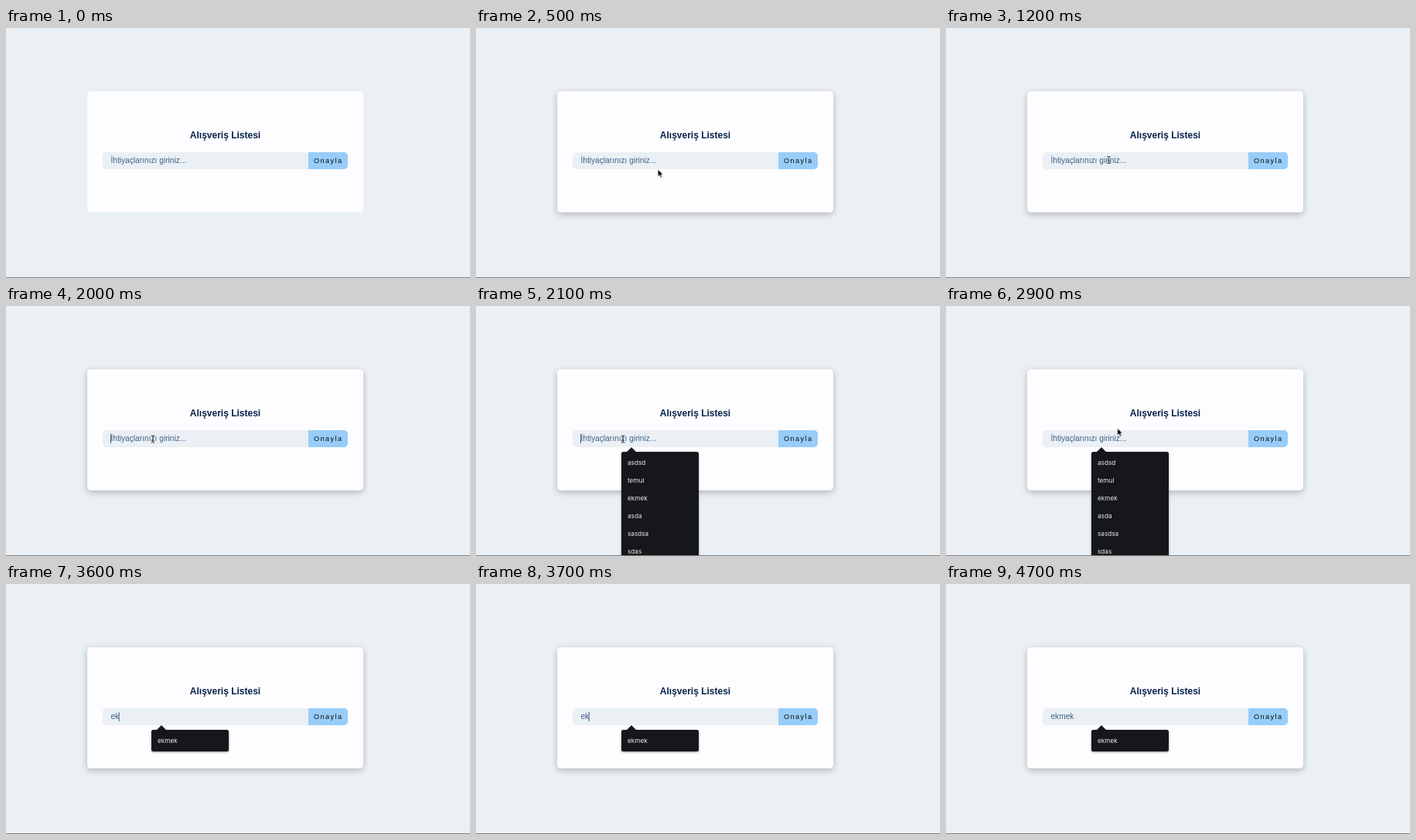
Animation of 600 by 324 pixels, one loop 5 s. Source, as an HTML page:

```html
<!DOCTYPE html>
<html lang="tr">
<head>
<meta charset="utf-8">
<title>Alışveriş Listesi</title>
<style>
  html, body { margin: 0; width: 100%; height: 100%; overflow: hidden; }
  .stage {
    position: relative; width: 600px; height: 324px; overflow: hidden;
    background: #ebf0f4; font-family: "Liberation Sans", Arial, sans-serif;
  }
  .stage div, .stage svg { position: absolute; box-sizing: border-box; white-space: nowrap; }
  .stage::after {
    content: ""; position: absolute; left: 0; top: 323px;
    width: 600px; height: 1px; background: #7b7f85;
  }

  .shadow, .card { left: 105px; top: 82px; width: 357px; height: 157px; border-radius: 5px; }
  .card { background: #fdfcfe; }
  .shadow { box-shadow: 0 2.5px 8px rgba(0, 0, 0, .25); animation: lift 5s infinite; }

  .title {
    left: 105px; top: 129px; width: 357px; line-height: 20px;
    text-align: center; font-size: 12px; font-weight: bold; color: #06234a;
  }
  .field, .button { top: 161px; height: 22px; line-height: 22px; }
  .field {
    left: 125px; width: 266px; border-radius: 5px 0 0 5px;
    background: #eaf0f4; color: #41618a; font-size: 10.2px;
  }
  .hint { left: 10.4px; animation: hint 5s step-end infinite; }
  .typed { left: 10.4px; height: 22px; overflow: hidden; animation: type 5s step-end infinite; }
  .caret { left: 10.4px; top: 5px; width: 1px; height: 12px; background: #3f5a7c; animation: caret 5s step-end infinite; }
  .button {
    left: 391px; width: 51px; padding-left: 7px; border-radius: 0 5px 5px 0;
    background: #97cdf8; color: #0b0f14; font-size: 9.1px; letter-spacing: 1.45px;
  }

  .popup {
    left: 188px; top: 188.5px; width: 100px; padding: 3px 8px; border-radius: 2.5px;
    background: #16171b; color: #eceded; box-shadow: 0 1px 3px rgba(0, 0, 0, .4);
    font: 8.2px/23px Inter, sans-serif;
  }
  .popup::before {
    content: ""; position: absolute; left: 7px; top: -6px;
    border: solid transparent; border-width: 0 6.5px 6.5px; border-bottom-color: #16171b;
  }
  .popup p { margin: 0; }
  .all { height: 150px; animation: all 5s step-end infinite; }
  .match { height: 28.5px; animation: match 5s step-end infinite; }

  .pointer { left: 0; top: 0; width: 1px; height: 1px; animation: move 5s infinite; }
  .pointer svg { left: 0; top: 0; overflow: visible; }
  .arrow { animation: arrow 5s step-end infinite; }
  .beam { animation: beam 5s step-end infinite; }

  @keyframes lift {
    0% { opacity: 0; animation-timing-function: steps(4); }
    8%, 100% { opacity: 1; }
  }
  @keyframes hint {
    0% { visibility: visible; }
    70%, 100% { visibility: hidden; }
  }
  @keyframes type {
    0% { width: 0; }
    70% { width: .556em; }
    72% { width: 1.056em; }
    76% { width: 1.889em; }
    80% { width: 2.445em; }
    84%, 100% { width: 2.96em; }
  }
  @keyframes caret {
    0% { opacity: 0; transform: none; }
    38% { opacity: 1; transform: none; }
    50% { opacity: 0; transform: none; }
    60% { opacity: 1; transform: none; }
    70% { opacity: 1; transform: translateX(5.7px); }
    72% { opacity: 1; transform: translateX(10.6px); }
    76% { opacity: 1; transform: translateX(19.2px); }
    80% { opacity: 1; transform: translateX(24.9px); }
    84% { opacity: 1; transform: translateX(30px); }
    94%, 100% { opacity: 0; transform: translateX(30px); }
  }
  @keyframes all {
    0% { visibility: hidden; }
    42% { visibility: visible; }
    70%, 100% { visibility: hidden; }
  }
  @keyframes match {
    0% { visibility: hidden; }
    70%, 100% { visibility: visible; }
  }
  @keyframes move {
    0%, 2% { transform: translate(288px, 224px); animation-timing-function: steps(5); }
    12% { transform: translate(222px, 173px); animation-timing-function: steps(6); }
    24% { transform: translate(210.5px, 171px); animation-timing-function: steps(7); }
    38%, 48% { transform: translate(190px, 172.4px); animation-timing-function: steps(5); }
    58% { transform: translate(221.6px, 158.4px); animation-timing-function: steps(3); }
    64%, 100% { transform: translate(225px, 154px); }
  }
  @keyframes arrow {
    0% { visibility: hidden; }
    2% { visibility: visible; }
    12% { visibility: hidden; }
    50% { visibility: visible; }
    70%, 100% { visibility: hidden; }
  }
  @keyframes beam {
    0% { visibility: hidden; }
    12% { visibility: visible; }
    50%, 100% { visibility: hidden; }
  }
</style>
</head>
<body>
<div class="stage">
  <div class="shadow"></div>
  <div class="card"></div>
  <div class="title">Alışveriş Listesi</div>
  <div class="field">
    <div class="hint">İhtiyaçlarınızı giriniz...</div>
    <div class="typed">ekmek</div>
    <div class="caret"></div>
  </div>
  <div class="button">Onayla</div>
  <div class="popup all">
    <p>asdsd</p><p>temul</p><p>ekmek</p><p>asda</p><p>sasdsa</p><p>sdas</p>
  </div>
  <div class="popup match"><p>ekmek</p></div>
  <div class="pointer">
    <svg class="arrow" width="8" height="12">
      <path d="M0 0V9.4L2.2 7.4L3.7 11L5.4 10.3L3.9 6.8H6.8Z" fill="#000" stroke="#fff" stroke-width=".7"/>
    </svg>
    <svg class="beam" width="6" height="10" fill="none">
      <path id="bar" d="M-2.2 -4.6Q0 -4.6 0 -3.4Q0 -4.6 2.2 -4.6M0 -3.4V3.4M-2.2 4.6Q0 4.6 0 3.4Q0 4.6 2.2 4.6M-1.2 1.2H1.2" stroke="#fff" stroke-opacity=".7" stroke-width="1.8"/>
      <use href="#bar" stroke="none"/>
      <path d="M-2.2 -4.6Q0 -4.6 0 -3.4Q0 -4.6 2.2 -4.6M0 -3.4V3.4M-2.2 4.6Q0 4.6 0 3.4Q0 4.6 2.2 4.6M-1.2 1.2H1.2" stroke="#111" stroke-width="1"/>
    </svg>
  </div>
</div>
</body>
</html>
```
